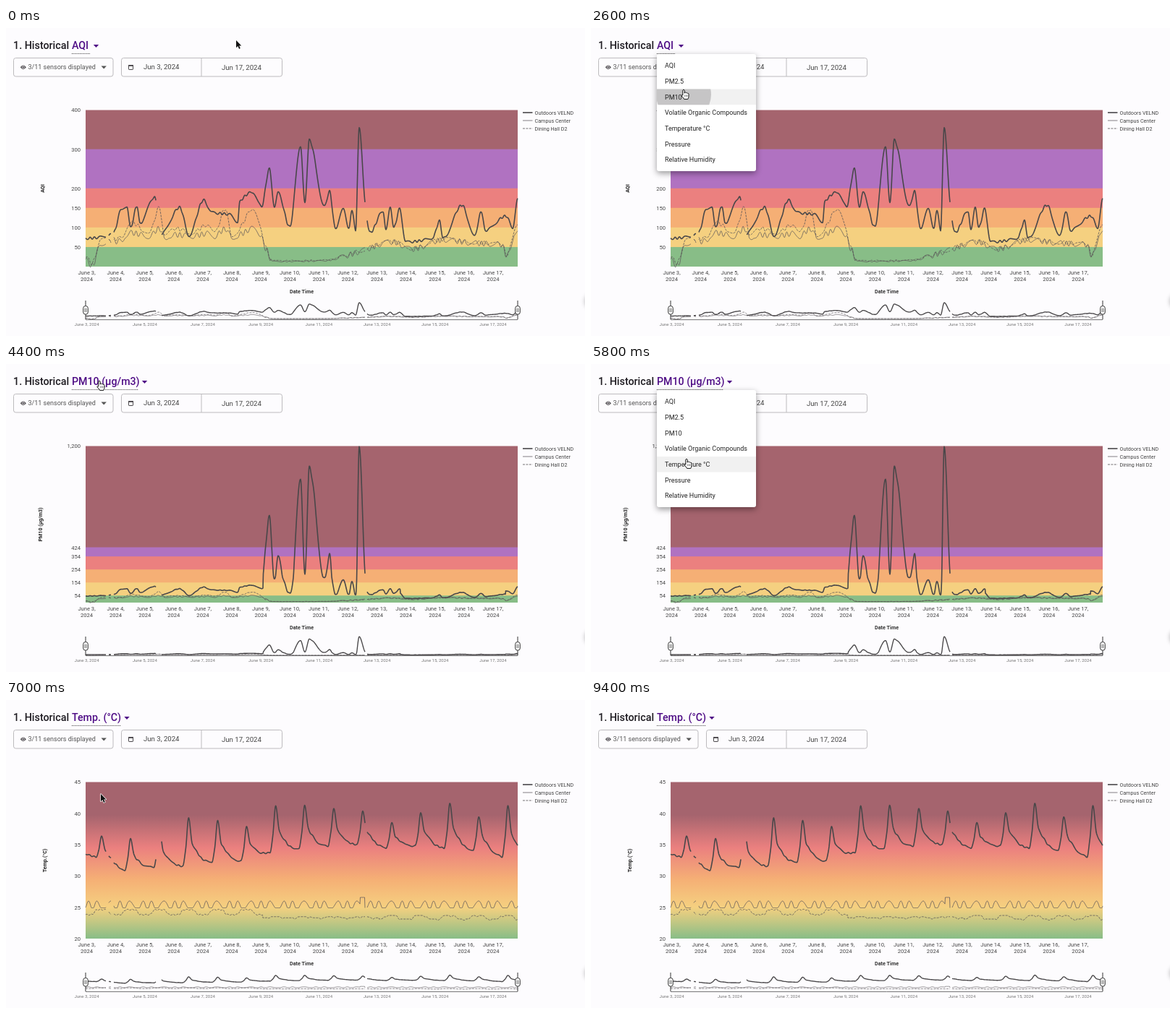
An HTML page with a canvas that plays this animation: 800x426 px, repeating every 9600 ms.

```html
<!DOCTYPE html>
<html lang="en">
<head>
<meta charset="utf-8">
<title>Historical air quality</title>
<style>
  html, body { margin: 0; width: 100%; height: 100%; overflow: hidden; background: #fdfcfe; }
  canvas { display: block; }
</style>
</head>
<body>
<canvas id="stage" width="800" height="426"></canvas>
<script>
const ctx = document.getElementById('stage').getContext('2d');
const LOOP = 9600, STEP = 200;
const LEFT = 110, RIGHT = 707, TOP = 113.5, BOTTOM = 330, DAY = 40.1;
const INK = '#494749', PURPLE = '#4f0d86';
const COLORS = ['#a5646e', '#b072c1', '#eb807f', '#f5af75', '#f5d080', '#88bd87'];
const MENU = ['AQI', 'PM2.5', 'PM10', 'Volatile Organic Compounds', 'Temperature °C', 'Pressure', 'Relative Humidity'];
const MENU_TOP = 41.3, ROW = 21.65;

const VIEWS = [
  { title: 'AQI', end: 116, axisX: 50, min: 0, max: 400, ticks: [400, 300, 200, 150, 100, 50] },
  { title: 'PM10 (µg/m3)', end: 183, axisX: 47, min: 0, max: 1200, ticks: [1200, 424, 354, 254, 154, 54] },
  { title: 'Temp. (°C)', axis: 'Temp.(°C)', end: 158.5, axisX: 53, min: 20, max: 45,
    ticks: [45, 40, 35, 30, 25, 20], smooth: true }
];

const SERIES = [
  { name: 'Outdoors VELND', width: 1.6, dash: [], color: INK },
  { name: 'Campus Center', width: 0.75, dash: [], color: '#5a5558' },
  { name: 'Dining Hall D2', width: 0.85, dash: [3, 1.4], color: '#5a5558' }
];

// Main turning points as x, y pairs in stage pixels
const outdoorAqi = [
  110,291, 138,288, 149,283, 159,251, 167,247, 172,276, 181,246, 185,270, 205,234,
  215,284, 240,248, 253,287, 273,238, 284,255, 309,258, 320,268, 323,241, 341,227, 353,247,
  364,195, 371,248, 376,228, 392,275, 407,163, 413,243, 419,155, 440,247, 447,226, 455,277,
  466,251, 474,277, 478,251, 483,280, 488,139, 496,240,
  503,283, 521,253, 525,278, 531,249, 536,276, 544,250, 552,296, 590,290, 599,267, 604,291,
  630,245, 647,288, 657,254, 662,280, 691,260, 700,276, 707,236
];
const indoorAqi = [
  110,317, 119,325, 131,294, 160,290, 172,268, 198,284, 212,248, 219,289, 232,277, 258,283,
  278,272, 288,284, 303,250, 312,289, 325,274, 341,249, 358,300, 369,322, 440,321, 490,308,
  535,295, 560,305, 605,292, 640,296, 685,299, 692,314, 707,272
];
// Daily temperature peaks and the lows before them
const peaks = [189, 191, 182, 162, 167, 175, 147, 145, 150, 153, 170, 156, 143, 161, 146];
const lows = [217, 237, 231, 230, 224, 223, 211, 206, 202, 200, 205, 202, 205, 208, 217, 213];
const heatOfDay = [-8,0, -4,0.35, 0,1, 5,0.45, 12,0.25, 20,0.08, 33,0];
const POINTER = [
  [0, 318, 17], [400, 318, 17], [1000, 106, 24], [1400, 106, 24], [2400, 128, 85], [3800, 128, 85],
  [4400, 129, 23], [5000, 129, 23], [5800, 132, 131], [6600, 131, 130]
];

// Monotone cubic through x, y pairs
function curveAt(p, x) {
  const last = p.length - 2;
  let i = 0;
  while (i < last - 2 && x > p[i + 2]) i += 2;
  const slope = j => (p[j + 3] - p[j + 1]) / (p[j + 2] - p[j]);
  const tangent = j => {
    if (j <= 0 || j >= last) return 0;
    const a = slope(j - 2), b = slope(j);
    return a * b > 0 ? 2 * a * b / (a + b) : 0;
  };
  const w = p[i + 2] - p[i], u = (x - p[i]) / w, v = 1 - u;
  return v * v * ((1 + 2 * u) * p[i + 1] + u * w * tangent(i)) +
         u * u * ((3 - 2 * u) * p[i + 3] - v * w * tangent(i + 2));
}

const ripple = (x, speed) => Math.sin(x * speed + 2 * Math.sin(x * 0.21));

function aqiY(series, x) {
  if (series === 0) return curveAt(outdoorAqi, x) + 1.5 * ripple(x, 0.7);
  const dining = curveAt(indoorAqi, x), calm = x > 365 && x < 460;
  if (series === 2) return dining + ripple(x, 0.5) * (calm ? 0.7 : 2.5);
  const campus = Math.max(dining, 284 + (dining - 284) * 0.3) + (x < 360 ? 4 : 1);
  return campus + ripple(x, 0.62) * (calm ? 0.7 : 3.5);
}

function dustY(series, x) {
  const aqi = (BOTTOM - aqiY(series, x)) / (BOTTOM - TOP) * 400;
  let value = aqi * 0.55;
  if (series === 0) {
    value = x > 355 && x < 498
      ? Math.max(0.65 * aqi, 65 + 2.25 * (aqi - 100), 200 + 5.1 * (aqi - 160))
      : aqi * (x < 545 || x > 690 ? 0.7 : 0.5);
  }
  return BOTTOM - value / 1200 * (BOTTOM - TOP);
}

function tempY(series, x) {
  if (series === 0) {
    const day = Math.floor((x - 124) / DAY), hour = x - 132 - day * DAY;
    const before = lows[day] ?? 212, after = lows[day + 1];
    const low = before + (after - before) * (hour + 8) / DAY;
    return low + ((peaks[day] ?? 190) - low) * curveAt(heatOfDay, Math.min(hour, 33)) + 0.8 * ripple(x, 0.6);
  }
  if (series === 1) {
    if (x > 489 && x < 496) return 273;
    return Math.min(287.5, 284 - 6 * Math.sin((x - 109) * 0.42 + Math.sin(x * 0.16)));
  }
  const shift = Math.tanh(3 * Math.sin((x - 162) * Math.PI / 20));
  return x < 355 ? 293.5 - 3.5 * shift + 0.7 * Math.sin(x)
                 : 300.5 - (x > 515 ? 2.5 : 0.8) * shift + Math.max(0, Math.sin(x * 0.35) - 0.6) * 4;
}

function tracePath(yAt, series) {
  const gaps = [[138, 142], [145, 149], [496, 499]];
  if (series === 0) gaps.push([207, 215]);
  const path = new Path2D();
  let down = false;
  for (let x = LEFT; x <= RIGHT; x += 0.5) {
    if (gaps.some(([a, b]) => x > a && x < b)) { down = false; continue; }
    path[down ? 'lineTo' : 'moveTo'](x, yAt(series, x));
    down = true;
  }
  return path;
}

const PATHS = [aqiY, dustY, tempY].map(yAt => SERIES.map((_, s) => tracePath(yAt, s)));
const SMALL = 0.12;
const OVERVIEWS = PATHS.map(set => set.map(path => {
  const small = new Path2D();
  small.addPath(path, new DOMMatrix([1, 0, 0, SMALL, 0, 403 - BOTTOM * SMALL]));
  return small;
}));

function text(str, x, y, size, color = '#444', align = 'left', weight = 400) {
  ctx.font = `${weight} ${size}px Roboto, sans-serif`;
  ctx.fillStyle = color;
  ctx.textAlign = align;
  ctx.fillText(str, x, y + size * 0.355);
}

function line(x1, y1, x2, y2, color, width = 1, dash = []) {
  ctx.strokeStyle = color;
  ctx.lineWidth = width;
  ctx.setLineDash(dash);
  ctx.beginPath();
  ctx.moveTo(x1, y1);
  ctx.lineTo(x2, y2);
  ctx.stroke();
  ctx.setLineDash([]);
}

function box(x, y, w, h, r, fill, stroke) {
  ctx.beginPath();
  ctx.roundRect(x, y, w, h, r);
  if (fill) { ctx.fillStyle = fill; ctx.fill(); }
  if (stroke) { ctx.strokeStyle = stroke; ctx.lineWidth = 1; ctx.stroke(); }
}

function caret(x, y, color) {
  ctx.fillStyle = color;
  ctx.fill(new Path2D(`M${x - 3.7} ${y - 2}h7.4l-3.7 4z`));
}

function strokeSeries(paths, scale) {
  SERIES.forEach((s, i) => {
    ctx.strokeStyle = s.color;
    ctx.lineWidth = s.width * scale;
    ctx.lineJoin = 'round';
    ctx.setLineDash(s.dash);
    ctx.stroke(paths[i]);
  });
  ctx.setLineDash([]);
}

function drawHeader(view) {
  text('1. Historical', 10, 24, 14.3, '#1d1a20', 'left', 500);
  text(view.title, 91, 24, 14.2, PURPLE, 'left', 500);
  line(91, 35.5, view.end, 35.5, '#333', 1, [1, 1.2]);
  caret(view.end + 8.5, 25, PURPLE);

  box(10.5, 41.5, 137.5, 25.5, 3, '#fdfcfe', '#bdbbbe');
  ctx.fillStyle = '#4a474b';
  ctx.fill(new Path2D('M19.8 54.3q4-5.8 8 0q-4 5.8-8 0z'));
  ctx.strokeStyle = '#fdfcfe';
  ctx.lineWidth = 0.8;
  ctx.beginPath();
  ctx.arc(23.8, 54.3, 1.6, 0, 7);
  ctx.stroke();
  text('3/11 sensors displayed', 30.5, 54.3, 9, '#555');
  caret(135.2, 54.6, '#555');

  box(159.5, 41.5, 222, 25.5, 3, '#fdfcfe', '#bdbbbe');
  line(270, 41.5, 270, 67, '#bdbbbe');
  box(169.5, 51.5, 6, 6, 0.6, null, '#4a474b');
  line(169, 52, 176, 52, '#4a474b', 1.8);
  text('Jun 3, 2024', 190, 54, 9.6);
  text('Jun 17, 2024', 298, 54.6, 9.6);
}

const valueY = (view, value) => BOTTOM - (value - view.min) / (view.max - view.min) * (BOTTOM - TOP);

function drawBands(view) {
  if (view.smooth) {
    const fade = ctx.createLinearGradient(0, TOP, 0, BOTTOM);
    [[0, 0], [0.21, 0], [0.42, 2], [0.62, 3], [0.8, 4], [1, 5]].forEach(([at, c]) => fade.addColorStop(at, COLORS[c]));
    ctx.fillStyle = fade;
    ctx.fillRect(LEFT, TOP, RIGHT - LEFT, BOTTOM - TOP);
    return;
  }
  COLORS.forEach((color, i) => {
    const top = valueY(view, view.ticks[i]);
    ctx.fillStyle = color;
    ctx.fillRect(LEFT, top, RIGHT - LEFT, BOTTOM - top);
  });
}

function drawChart(view, bandView, paths, shift) {
  ctx.save();
  ctx.translate(0, shift);
  drawBands(bandView);
  strokeSeries(paths, 1);
  view.ticks.forEach(v => text(v.toLocaleString('en-US'), 103, valueY(view, v) + 0.3, 7.6, '#444', 'right'));
  for (let i = 0; i < 15; i++) {
    const x = 111.5 + i * DAY;
    text(`June ${i + 3},`, x, 338.5, 7.6, '#444', 'center');
    text('2024', x, 347.5, 7.6, '#444', 'center');
  }
  text('Date Time', 408.5, 364, 7.2, '#333', 'center', 700);
  SERIES.forEach((s, i) => {
    const y = 117 + i * 11;
    line(714, y, 727.5, y, s.color, s.width, s.dash);
    text(s.name, 730.5, y, 7.2);
  });
  ctx.translate(view.axisX, 222);
  ctx.rotate(-Math.PI / 2);
  text(view.axis ?? view.title, 0, 0, 7.1, '#222', 'center', 700);
  ctx.restore();
}

function drawOverview(paths) {
  strokeSeries(paths, 0.85);
  line(LEFT, 403.5, RIGHT, 403.5, '#555', 0.8);
  for (const x of [LEFT, RIGHT]) {
    line(x, 377, x, 403, '#333');
    box(x - 3.3, 384.5, 6.6, 11.5, 3, '#fff', '#333');
    for (const dx of [-1, 1]) line(x + dx, 387.5, x + dx, 393, '#333', 0.7);
  }
  for (let i = 0; i < 8; i++) text(`June ${3 + 2 * i}, 2024`, 111.5 + i * 2 * DAY, 409.5, 6, '#777', 'center');
}

function shadowBox(x, y, w, h, r, color, blur, drop) {
  ctx.save();
  ctx.shadowColor = color;
  ctx.shadowBlur = blur;
  ctx.shadowOffsetY = drop;
  box(x, y, w, h, r, '#fff');
  ctx.restore();
}

function drawMenu(x, y, pressed) {
  shadowBox(91, 36, 137, 162, 3, 'rgba(0,0,0,.4)', 8, 3);
  const row = Math.floor((y - MENU_TOP) / ROW);
  if (row >= 0) {
    ctx.save();
    ctx.beginPath();
    ctx.rect(91, MENU_TOP + row * ROW, 137, ROW);
    ctx.clip();
    box(91, 36, 137, 162, 0, '#f1f1f1');
    if (pressed) box(x - 38, y - 31, 76, 76, 38, '#c6c5c6');
    ctx.restore();
  }
  MENU.forEach((item, i) => text(item, 102, 52.2 + i * ROW, 9, '#222'));
}

const ARROW = new Path2D('M0 0v10.2l2.4-2.2 1.7 3.9 1.7-.8-1.7-3.7h3.2z');
const HAND = new Path2D('M-1.2 1.2q1.2-2 2.4 0v4l.4-1q1.3-.6 2 .6q1.3-.6 1.9.6q1.4-.4 1.5 1v3q0 2-1.2 4h-5.2q-1-2.3-3.8-4.6q.3-1.9 2-.7z');

function drawPointer(x, y, hand) {
  const shape = hand ? HAND : ARROW;
  ctx.save();
  ctx.translate(x, y);
  ctx.lineJoin = 'round';
  ctx.fillStyle = hand ? '#fff' : '#111';
  ctx.strokeStyle = hand ? '#111' : '#fff';
  ctx.lineWidth = hand ? 1 : 1.4;
  if (hand) ctx.fill(shape);
  ctx.stroke(shape);
  if (!hand) ctx.fill(shape);
  ctx.restore();
  if (hand) for (const dx of [1.6, 3.4, 5]) line(x + dx, y + 7.5, x + dx, y + 10, '#333', 0.6);
}

function pointerAt(t) {
  const next = POINTER.findIndex(k => k[0] > t);
  if (next < 0) return POINTER[POINTER.length - 1].slice(1);
  const [t0, x0, y0] = POINTER[next - 1], [t1, x1, y1] = POINTER[next];
  const u = (t - t0) / (t1 - t0), ease = u * u * (3 - 2 * u);
  return [x0 + (x1 - x0) * ease, y0 + (y1 - y0) * ease];
}

function draw(t) {
  const picked = t < 2800 ? 0 : t < 6400 ? 1 : 2;
  const loading = t >= 2800 && t < 3800;
  const shown = loading ? 0 : picked;
  const menuOpen = (t >= 1200 && t <= 2600) || (t >= 4800 && t <= 6000);
  const [x, y] = pointerAt(t);

  ctx.fillStyle = '#fdfcfe';
  ctx.fillRect(0, 0, 800, 426);
  drawHeader(VIEWS[picked]);
  drawOverview(OVERVIEWS[picked]);
  drawChart(VIEWS[shown], VIEWS[picked], PATHS[shown], loading ? 16 : 0);
  shadowBox(800, 368, 20, 20, 10, 'rgba(0,0,0,.3)', 6, 0);
  if (loading) {
    box(10, 67.5, 151, 14, 0, '#b11a1b');
    text('Cannot draw chart: no data specified.', 11.5, 74.5, 8.9, '#fff');
  }
  if (menuOpen) drawMenu(x, y, t === 2600 || t === 6000);
  if (t < 8000) drawPointer(x, y, t >= 1000 && t < 6400);
}

function tick() {
  draw(Math.floor(performance.now() % LOOP / STEP) * STEP);
  requestAnimationFrame(tick);
}
tick();
</script>
</body>
</html>
```
